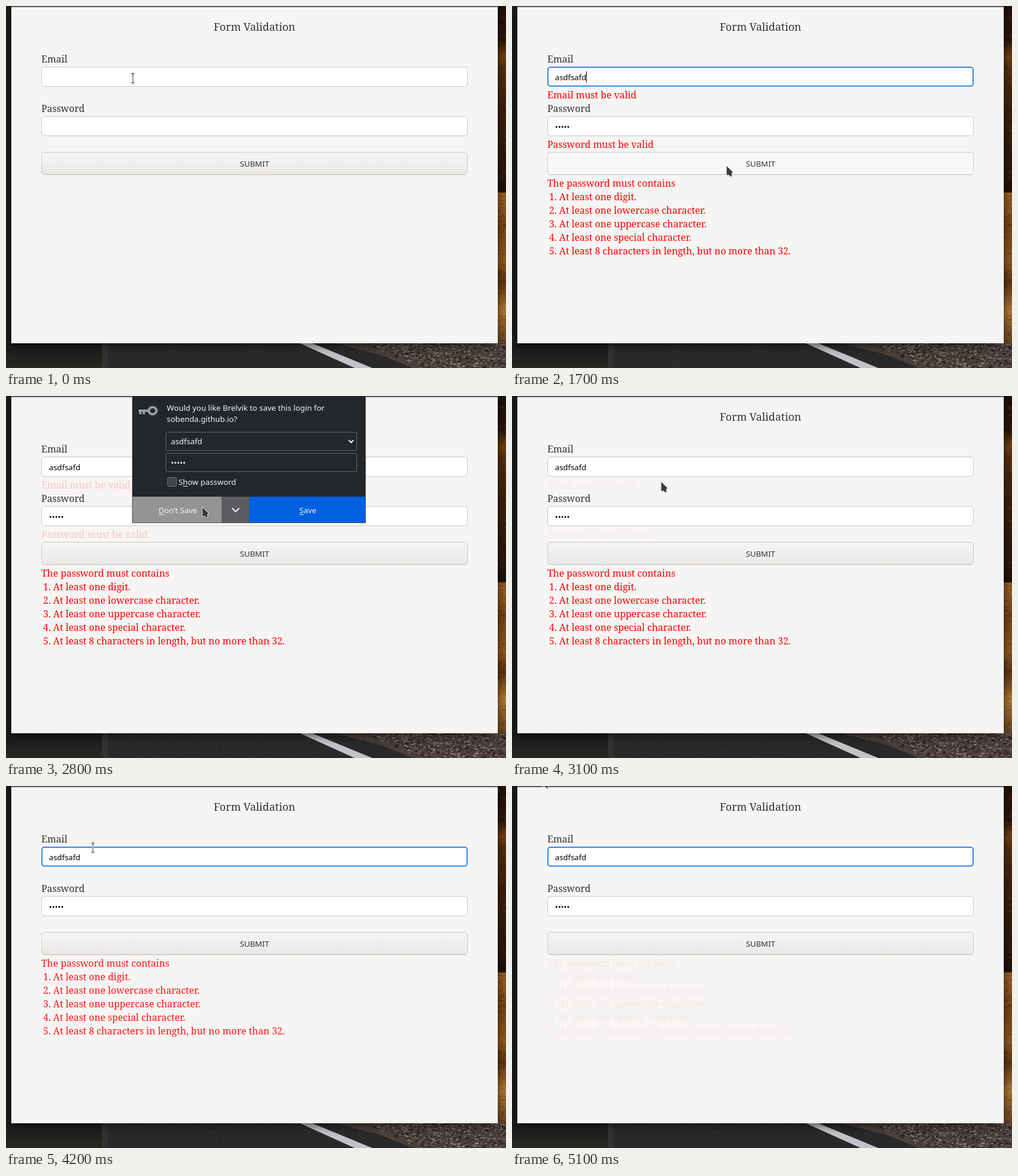
An HTML page with a canvas that plays this animation: 849 by 615 pixels, repeating every 5200 ms.

```html
<!DOCTYPE html>
<html lang="en">
<head>
<meta charset="utf-8">
<title>Form Validation</title>
<style>
html, body { margin: 0; width: 100%; height: 100%; overflow: hidden; background: #1b1b1b; }
canvas { display: block; }
</style>
</head>
<body>
<canvas id="stage" width="849" height="615"></canvas>
<script>
const W = 849, H = 615, LOOP = 5200, STEP = 100;
const SERIF = '16px "Noto Serif", serif';
const TITLE = '18px "Noto Serif", serif';
const SANS = '13.333px "Noto Sans", sans-serif';
const INK = '#2e3436', DARK = '#232729';
const ctx = document.getElementById('stage').getContext('2d');
const NAME = 'asdfsafd', DOT = '\u2022';
const RULES = [
  'At least one digit.',
  'At least one lowercase character.',
  'At least one uppercase character.',
  'At least one special character.',
  'At least 8 characters in length, but no more than 32.'
];

// Pointer path: time, x, y, shape
const PATH = [
  [0, 215, 122, 'beam'], [500, 215, 122, 'beam'], [700, 177, 214, 'beam'],
  [1200, 177, 214, 'beam'], [1400, 364, 271, 'arrow'], [2100, 364, 271, 'arrow'],
  [2400, 333, 188, 'arrow'], [2900, 333, 188, 'arrow'], [3200, 213, 123, 'beam'],
  [3400, 205, 135, 'arrow'], [3600, 200, 134, 'arrow'], [3700, 180, 124, 'beam'],
  [3900, 180, 124, 'beam'], [4200, 147, 104, 'beam'], [4300, 52, -15, 'arrow']
];

function text(s, x, y, font, color, align = 'left') {
  ctx.font = font;
  ctx.fillStyle = color;
  ctx.textAlign = align;
  ctx.fillText(s, x, y);
}

function rect(c, x, y, w, h, fill) {
  c.fillStyle = fill;
  c.fillRect(x, y, w, h);
}

function rounded(x, y, w, h, r, fill, stroke, line = 1) {
  ctx.beginPath();
  ctx.roundRect(x, y, w, h, r);
  ctx.fillStyle = fill;
  ctx.fill();
  ctx.strokeStyle = stroke;
  ctx.lineWidth = line;
  ctx.stroke();
}

function shape(c, points, fill) {
  c.beginPath();
  points.forEach(([x, y]) => c.lineTo(x, y));
  c.closePath();
  c.fillStyle = fill;
  c.fill();
}

function ramp(c, y0, y1, stops) {
  const g = c.createLinearGradient(0, y0, 0, y1);
  stops.forEach(([at, color]) => g.addColorStop(at, color));
  return g;
}

function random(seed) {
  return () => (seed = (seed * 16807) % 2147483647) / 2147483647;
}

// Simplified desktop photo with the window on top
function makeBackdrop() {
  const canvas = document.createElement('canvas');
  canvas.width = W;
  canvas.height = H;
  const c = canvas.getContext('2d'), rnd = random(71);
  rect(c, 0, 0, W, H, '#1d1d1c');
  rect(c, 0, 573, 163, 42, ramp(c, 573, 615, [[0, '#191a18'], [1, '#272824']]));
  rect(c, 163, 573, 10, 42, '#32332f');
  rect(c, 173, 573, 676, 42, '#29292b');
  shape(c, [[560, 573], [849, 573], [849, 615], [690, 615], [640, 594]], '#4b3f3b');
  for (let i = 0; i < 2200; i++) {
    const v = 25 + rnd() * 40 | 0;
    rect(c, 173 + rnd() * 460, 573 + rnd() * 42, 1, 1, `rgb(${v},${v},${v + 3})`);
  }
  for (let i = 0; i < 900; i++) {
    const y = rnd() * 42, x = 610 + y * 2.1 + rnd() * 240;
    rect(c, x, 573 + y, 1 + rnd() * 4, 1 + rnd(), ['#1f1715', '#8d8785', '#6d625e', '#3c2a21'][rnd() * 4 | 0]);
  }
  shape(c, [[499, 573], [520, 573], [622, 615], [592, 615]], '#c3c3c7');
  rect(c, 835, 0, 14, 573, ramp(c, 0, 573, [
    [0, '#211107'], [.1, '#2a1509'], [.15, '#74400f'], [.18, '#55300f'], [.3, '#3d210d'],
    [.5, '#2b170a'], [.55, '#1f1007'], [.556, '#a4672b'], [.65, '#764517'],
    [.76, '#925a22'], [.82, '#5d3511'], [.9, '#b57b35'], [1, '#6a4523']
  ]));
  for (let i = 0; i < 350; i++) {
    rect(c, 835 + rnd() * 14, rnd() * 573, 1 + rnd() * 4, 1, rnd() < .6 ? 'rgba(20,9,3,.45)' : 'rgba(176,112,50,.3)');
  }
  c.shadowColor = 'rgba(0,0,0,.65)';
  c.shadowBlur = 16;
  c.shadowOffsetY = 3;
  rect(c, 9, 0, 826, 573, '#f6f5f4');
  c.shadowColor = 'transparent';
  rect(c, 9, 0, 826, 2, '#57585a');
  return canvas;
}

function field(y, value, focused, caret) {
  if (focused) rounded(61, y + 1, 722, 32, 4, '#fff', '#3584e4', 2);
  else rounded(60.5, y + .5, 723, 33, 4.5, '#fff', '#cdc7c2');
  text(value, 73, y + 23, SANS, '#000');
  if (caret) rect(ctx, Math.round(73 + ctx.measureText(value).width), y + 8, 1, 19, '#000');
}

function submitButton(hover) {
  const fill = hover ? '#f8f8f7' : ramp(ctx, 249, 286, [[0, '#f6f5f4'], [1, '#eae8e6']]);
  rounded(60.5, 248.5, 723, 38, 4.5, fill, '#cdc7c2');
  rect(ctx, 64, 286, 716, 1, '#bfb8b1');
  text('SUBMIT', 422, 273, SANS, INK, 'center');
}

function underlined(s, key, x, y) {
  text(s, x, y, SANS, '#f4f4f5');
  const start = x + ctx.measureText(s.slice(0, key)).width;
  rect(ctx, start, y + 2, ctx.measureText(s[key]).width, 1, '#f4f4f5');
}

function chevron(x, y, r) {
  ctx.beginPath();
  ctx.moveTo(x - r, y - r / 2);
  ctx.lineTo(x, y + r / 2);
  ctx.lineTo(x + r, y - r / 2);
  ctx.strokeStyle = '#f4f4f5';
  ctx.lineWidth = 2;
  ctx.stroke();
}

function keyIcon() {
  ctx.beginPath();
  ctx.ellipse(249, 25, 6.5, 6, 0, 0, 7);
  ctx.strokeStyle = '#9b9c9d';
  ctx.lineWidth = 4;
  ctx.stroke();
  rect(ctx, 225, 23, 18, 4, '#9b9c9d');
  rect(ctx, 226, 26, 4, 5, '#9b9c9d');
  rect(ctx, 232, 26, 4, 5, '#9b9c9d');
}

function savePanel(t) {
  const edge = '#66696b';
  rect(ctx, 214, 0, 397, 216, '#55585a');
  rect(ctx, 215, 0, 395, 215, DARK);
  keyIcon();
  text('Would you like Brelvik to save this login for', 273, 25, SANS, '#f4f4f5');
  text('sobenda.github.io?', 273, 44, SANS, '#f4f4f5');
  rounded(271.5, 61.5, 324, 31, 2, DARK, edge);
  rounded(271.5, 97.5, 324, 31, 2, DARK, edge);
  text(NAME, 280, 82, SANS, '#f4f4f5');
  text(DOT.repeat(5), 280, 118, SANS, '#f4f4f5');
  chevron(586, 77, 4);
  rounded(274.5, 138.5, 15, 15, 2, '#414547', '#777a7c');
  underlined('Show password', 1, 293, 151);
  rect(ctx, 215, 171, 151, 44, t >= 2700 ? '#939495' : t >= 2400 ? '#75777a' : '#5b5d60');
  rect(ctx, 366, 171, 47, 44, '#5b5d60');
  rect(ctx, 413, 171, 197, 44, '#0060df');
  underlined('Don\u2019t Save', 0, 259, 199);
  chevron(390, 193.5, 6);
  underlined('Save', 0, 498, 199);
}

function beam(x, y) {
  const part = (grow, color) => {
    const box = (bx, by, w, h) => rect(ctx, bx - grow, by - grow, w + 2 * grow, h + 2 * grow, color);
    box(x, y - 7, 1, 15);
    box(x - 2, y - 8, 5, 1);
    box(x - 2, y + 8, 5, 1);
  };
  ctx.save();
  ctx.shadowColor = 'rgba(0,0,0,.25)';
  ctx.shadowBlur = 2;
  ctx.shadowOffsetY = 1;
  part(1, '#fff');
  ctx.restore();
  part(0, '#3b3b3e');
}

function arrow(x, y) {
  ctx.save();
  ctx.translate(x, y);
  ctx.shadowColor = 'rgba(0,0,0,.3)';
  ctx.shadowBlur = 2;
  ctx.shadowOffsetY = 1;
  const outline = [[0, 0], [0, 17], [4, 16], [7, 19], [10, 18], [9, 13], [12, 12]];
  shape(ctx, outline, '#3b3b3e');
  ctx.shadowColor = 'transparent';
  ctx.strokeStyle = '#f4f4f4';
  ctx.lineWidth = 1;
  ctx.stroke();
  ctx.restore();
}

function pointer(t) {
  let i = PATH.length - 1;
  while (PATH[i][0] > t) i--;
  const a = PATH[i], b = PATH[i + 1] || a;
  const p = b === a ? 0 : (t - a[0]) / (b[0] - a[0]);
  const x = Math.round(a[1] + (b[1] - a[1]) * p);
  const y = Math.round(a[2] + (b[2] - a[2]) * p);
  (a[3] === 'beam' ? beam : arrow)(x, y);
}

function typed(t, start, steps, length) {
  return Math.max(0, Math.min(length, Math.ceil(length * ((t - start) / STEP + 1) / steps)));
}

function fieldErrors(t) {
  if (t < 1600 || t >= 3700) return 0;
  return t < 2700 ? 1 : .2 * Math.exp((2800 - t) / 213);
}

function ruleFade(t) {
  if (t < 1600) return 0;
  const p = Math.max(0, Math.min(1, (t - 3950) / 1360));
  return .5 + .5 * Math.cos(Math.PI * p);
}

function faded(alpha, paint) {
  if (alpha <= 0) return;
  ctx.globalAlpha = alpha;
  paint();
  ctx.globalAlpha = 1;
}

function draw(t) {
  ctx.drawImage(backdrop, 0, 0);
  text('Form Validation', 422, 42, TITLE, INK, 'center');
  text('Email', 60, 96, SERIF, INK);
  text('Password', 60, 180, SERIF, INK);

  const inEmail = (t >= 100 && t < 900) || (t >= 1600 && t < 2000) || t >= 3200;
  const inPassword = t >= 900 && t < 1600;
  field(103, NAME.slice(0, typed(t, 300, 5, 8)), inEmail, inEmail && t < 4000);
  field(187, DOT.repeat(typed(t, 1200, 3, 5)), inPassword, inPassword);
  submitButton(t >= 1400 && t < 2200);

  faded(fieldErrors(t), () => {
    text('Email must be valid', 60, 157, SERIF, '#f00');
    text('Password must be valid', 60, 241, SERIF, '#f00');
  });
  faded(ruleFade(t), () => {
    text('The password must contains', 60, 307, SERIF, '#f00');
    RULES.forEach((rule, i) => text(`${i + 1}. ${rule}`, 63, 330 + i * 23, SERIF, '#f00'));
  });

  if (t >= 1900 && t < 2900) faded(t < 2000 ? .5 : 1, () => savePanel(t));
  if (t >= 3300 && t < 3700) {
    rect(ctx, 60, 137, 723, 24, '#55585a');
    rect(ctx, 61, 138, 721, 22, DARK);
    text(NAME, 67, 155, SANS, '#f4f4f5');
  }
  pointer(t);
}

const backdrop = makeBackdrop();
const begin = performance.now();
function tick() {
  const t = (performance.now() - begin) % LOOP;
  draw(Math.floor(t / STEP) * STEP);
  requestAnimationFrame(tick);
}
tick();
</script>
</body>
</html>
```
